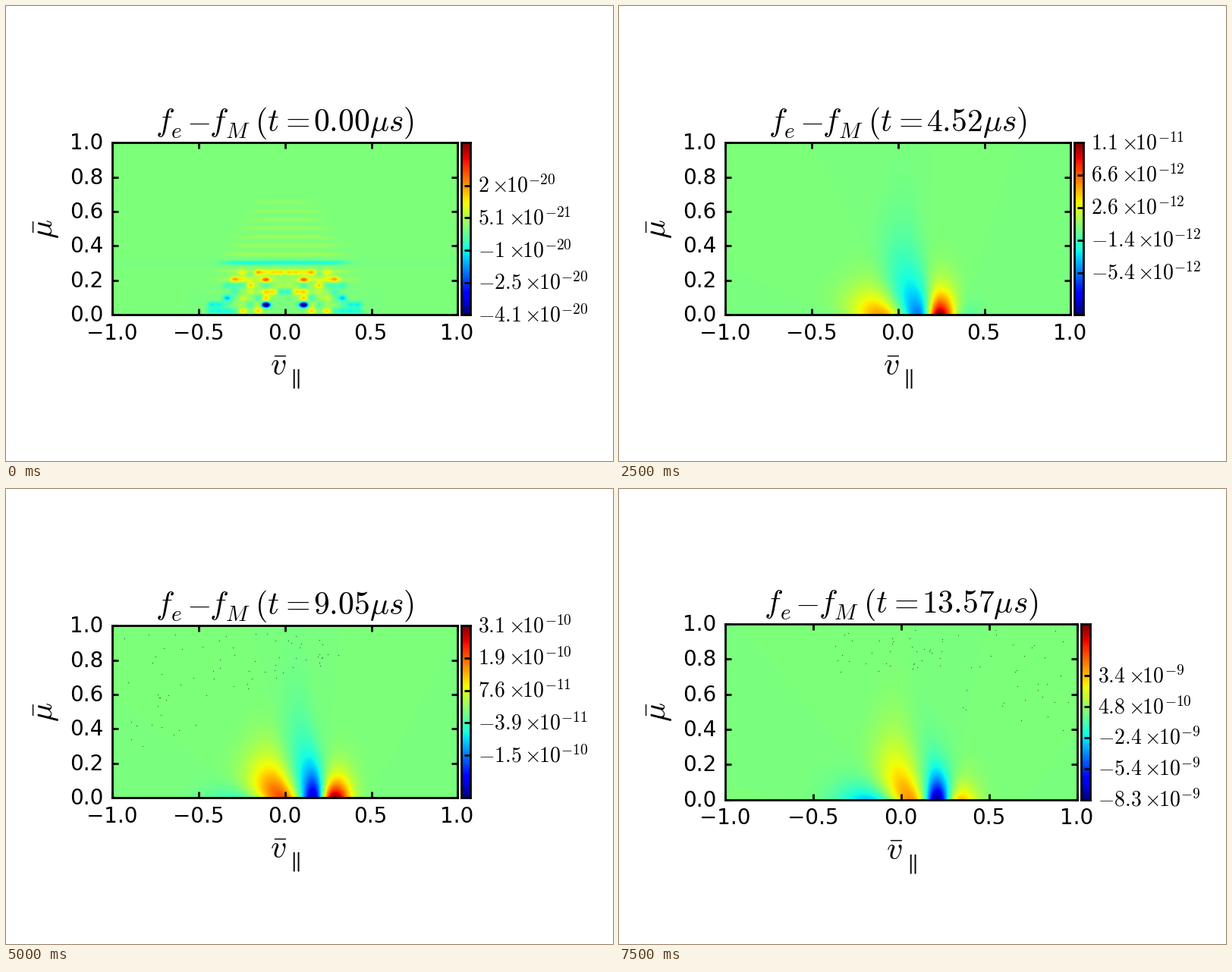
A matplotlib script for the animation above (8000 ms loop, 800x600 px).

```python
import numpy as np
import matplotlib.pyplot as plt
from matplotlib.animation import FuncAnimation

plt.rcParams.update({
    "font.family": "DejaVu Sans", "font.size": 20, "mathtext.fontset": "cm",
    "axes.linewidth": 2,
})

W, H = 800, 600
LEFT, MID_Y, BASE_W = 140.4, 293.75, 454.8
FRAMES, DT = 16, 0.9046

# Growth of the wave: step, log10 of the colour range, tick gap within it
STEP, RANGE, GAP = np.array([
    (0, 4.07e-20, .3752), (3, 2.0e-12, .385), (5, 1.06e-11, .3775),
    (8, 8.06e-11, .375), (11, 5.97e-10, .3769), (13, 1.68e-9, .50092),
    (15, 8.3e-9, .35265)]).T
RANGE = np.log10(RANGE)

X, M = np.meshgrid(np.linspace(-1, 1, 456), np.linspace(0, 1, 228))


def bell(x, c, w):
    return np.exp(-((x - c) / w) ** 2)


def wave(k):
    """Wave packet drifting to lower v, a sixth of a turn per step."""
    d = .15 - X
    spread = 1 + M * np.where(d > 0, 4, 1.5)
    phase = 2.3 * np.arcsinh(d / spread / .1) - (k - 13)
    reach = .12 + .18 * bell(X, .06, np.where(X < .06, .25, .1))
    size = (.48 * bell(X, -.05, .27)
            + .78 * bell(X, .24, np.where(X < .24, .1, .14)))
    f = size * np.exp(-(M / reach) ** 1.2) * np.cos(np.pi / 3 * phase)
    return f / np.abs(f).max()


def ripples():
    """Rounding noise of the first step, mirrored about v = 0."""
    rng = np.random.default_rng(4)
    side = np.abs(X)
    f = np.zeros_like(X)
    for m in np.arange(.2, .7, .05):
        a = -.25 if abs(m - .3) < .01 else .13 * (1 - m)
        f += a * bell(M, m, .012) / (1 + np.exp((side - .5 + .5 * m) / .03))
    for x in np.arange(.02, .5, .045):
        for m in np.arange(.02, .27, .037):
            a = rng.uniform(-.28, .42) if x < .3 else rng.uniform(-.4, .03)
            if x < .48 - .8 * m and np.hypot(x, m) > .13:
                f += a * bell(side, x, .026) * bell(M, m, .018)
    for a, m in [(-1.3, .055), (.45, .2)]:
        f += a * bell(side, .11, .024) * bell(M, m, .015)
    return np.clip(f, -1, .6)


def specks(k):
    """Sparse dark pixels in the flat part of the plane."""
    if k == 0 or k % 3 == 2:
        return [], []
    rng = np.random.default_rng(k)
    x = rng.uniform(-.4, .95, 70)
    low = .72 - .6 * np.maximum(x, 0)
    return x * (-1 if k % 3 == 1 else 1), low + (.96 - low) * rng.random(70)


def put(x, y, s, size=20, **kw):
    """Text with its baseline at a pixel place, y counted from the top."""
    return fig.text(x / W, 1 - y / H, s, fontsize=size, va="baseline", **kw)


def move(text, x, y):
    text.set_position((x / W, 1 - y / H))


def power(v):
    m, e = f"{v:.1e}".split("e")
    return rf"${float(m):g}\times\hspace{{-0.32}}10^{{{int(e)}}}$"


def decimal(v):
    return f"{v:.1f}".replace("-", "\u2212")


fig = plt.figure(figsize=(8, 6), dpi=100, facecolor="white")
ax = fig.add_axes([.2, .3, .5, .4])
cax = fig.add_axes([.75, .3, .015, .4])

image = ax.imshow(np.zeros_like(X), cmap="jet", vmin=-1, vmax=1,
                  origin="lower", extent=(-1, 1, 0, 1), aspect="auto",
                  interpolation="bilinear")
dots, = ax.plot([], [], ",", color="#2f4f2f")
x_ticks, y_ticks = np.linspace(-1, 1, 5), np.linspace(0, 1, 6)
ax.set(xlim=(-1, 1), ylim=(0, 1), xticks=x_ticks, yticks=y_ticks)

cax.imshow(np.linspace(-1, 1, 256)[:, None], cmap="jet", origin="lower",
           extent=(0, 1, -1, 1), aspect="auto")
cax.set_xticks([])
cax.yaxis.tick_right()
for a in (ax, cax):
    a.tick_params(direction="in", length=6, width=2, labelleft=False,
                  labelright=False, labelbottom=False)
ax.tick_params(top=True, right=True)

x_labels = [put(0, 0, decimal(v), ha="center") for v in x_ticks]
y_labels = [put(0, 0, decimal(v), ha="right") for v in y_ticks]
bar_labels = [put(0, 0, "") for _ in range(5)]

# Title and axis name pieces with their places at the base width
title = [(put(x, y, s, size), x, y) for x, y, s, size in [
    (197, 165, "$f$", 30), (217.5, 174, "$e$", 21), (238, 165, "$-$", 30),
    (268.5, 165, "$f$", 30), (289, 174, "$M$", 21), (328.3, 165, "", 30)]]
clock = title[-1][0]
name = [(put(x, y, s, size), x, y) for x, y, s, size in [
    (347.5, 487, r"$\bar{v}$", 30), (369, 499, r"$\parallel$", 21)]]
put(62, MID_Y, r"$\bar{\mu}$", 30, rotation=90, rotation_mode="anchor",
    ha="center")


def draw(k):
    # Shorter exponents at the end leave more room for the plot
    width = BASE_W if k < 14 else BASE_W + 9
    height = width / 2
    right, bottom = LEFT + width, MID_Y + height / 2
    ax.set_position([LEFT / W, 1 - bottom / H, width / W, height / H])
    cax.set_position([(right + 5) / W, 1 - bottom / H, 12 / W, height / H])

    f = wave(k) if k else ripples()
    image.set_data(f)
    dots.set_data(*specks(k))

    t = k * DT
    clock.set_text(rf"$(t\hspace{{0.05}}=\hspace{{-0.08}}{t:.2f}\mu s)$")
    dx, dy = (width - BASE_W) / 2, (height - BASE_W / 2) / 2
    for text, x, y in title:
        move(text, x + dx - (10.4 if t >= 10 else 0), y - dy)
    for text, x, y in name:
        move(text, x + dx, y + dy)
    for text, v in zip(x_labels, x_ticks):
        move(text, LEFT - .8 + width * (v + 1) / 2, bottom + 32.5)
    for text, v in zip(y_labels, y_ticks):
        move(text, LEFT - 11.9, bottom - height * v + 9)

    # Ticks count from the end of the bar that holds the extreme value
    start = np.sign(f.flat[np.abs(f).argmax()])
    ticks = start * (1 - np.interp(k, STEP, GAP) * np.arange(5))
    top = 10 ** np.interp(k, STEP, RANGE)
    cax.set_yticks(ticks)
    cax.set_ylim(-1, 1)
    for text, v in zip(bar_labels, ticks):
        text.set_text(power(v * top))
        move(text, right + 27.2, MID_Y - v * height / 2 + 9)
    return []


anim = FuncAnimation(fig, draw, frames=FRAMES, interval=500, repeat=True)
plt.show()
```
